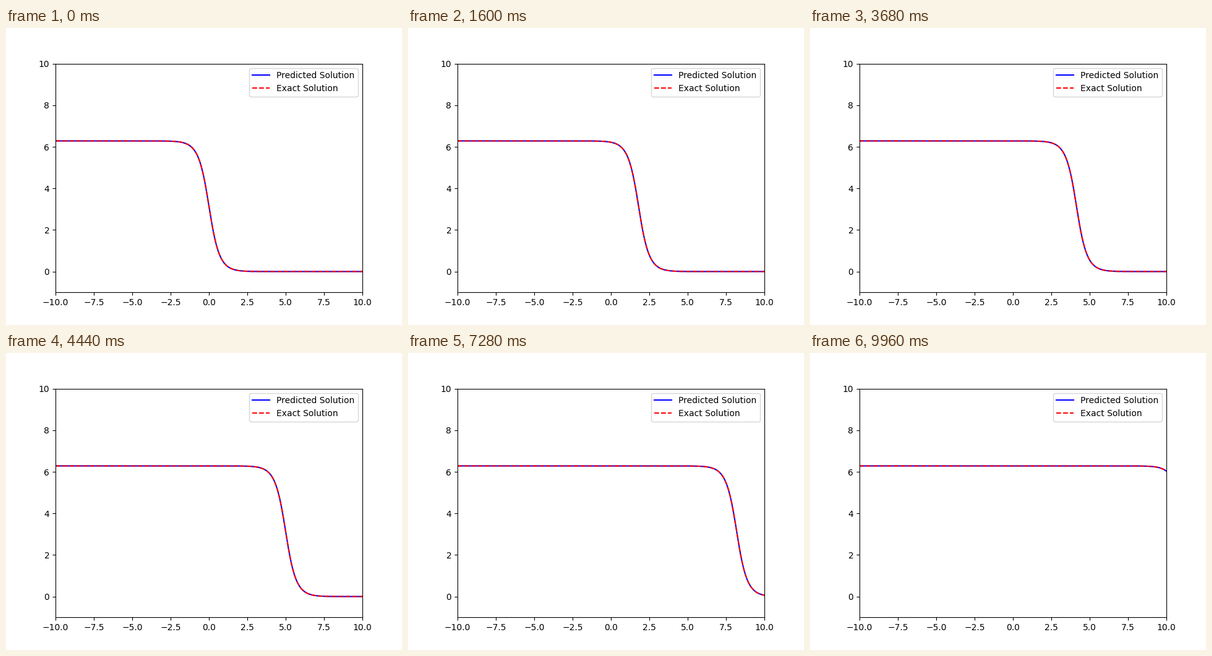
Animation, 640 px wide and 480 px high, one loop 10000 ms. Source, as a matplotlib script:

```python
import matplotlib.pyplot as plt
import numpy as np
from matplotlib.animation import FuncAnimation

FRAMES = 250
INTERVAL = 40   # ms per frame
DT = 0.05       # model time per frame
SPEED = 0.9     # kink velocity, in units of the wave speed

x = np.linspace(-10, 10, 1000)


def kink(t):
    """Travelling sine-Gordon kink, falling from 2*pi to 0."""
    gamma = 1 / np.sqrt(1 - SPEED**2)
    return 4 * np.arctan(np.exp(-gamma * (x - SPEED * t)))


fig, ax = plt.subplots(figsize=(6.4, 4.8), dpi=100)
predicted, = ax.plot(x, kink(0), "b-", label="Predicted Solution")
exact, = ax.plot(x, kink(0), "r--", label="Exact Solution")
ax.set_xlim(-10, 10)
ax.set_ylim(-1, 10)
ax.legend(loc="upper right")


def update(frame):
    u = kink(frame * DT)
    predicted.set_ydata(u)
    exact.set_ydata(u)
    return predicted, exact


anim = FuncAnimation(fig, update, frames=FRAMES, interval=INTERVAL,
                     init_func=lambda: update(0), repeat=True, repeat_delay=0)

plt.show()
```
